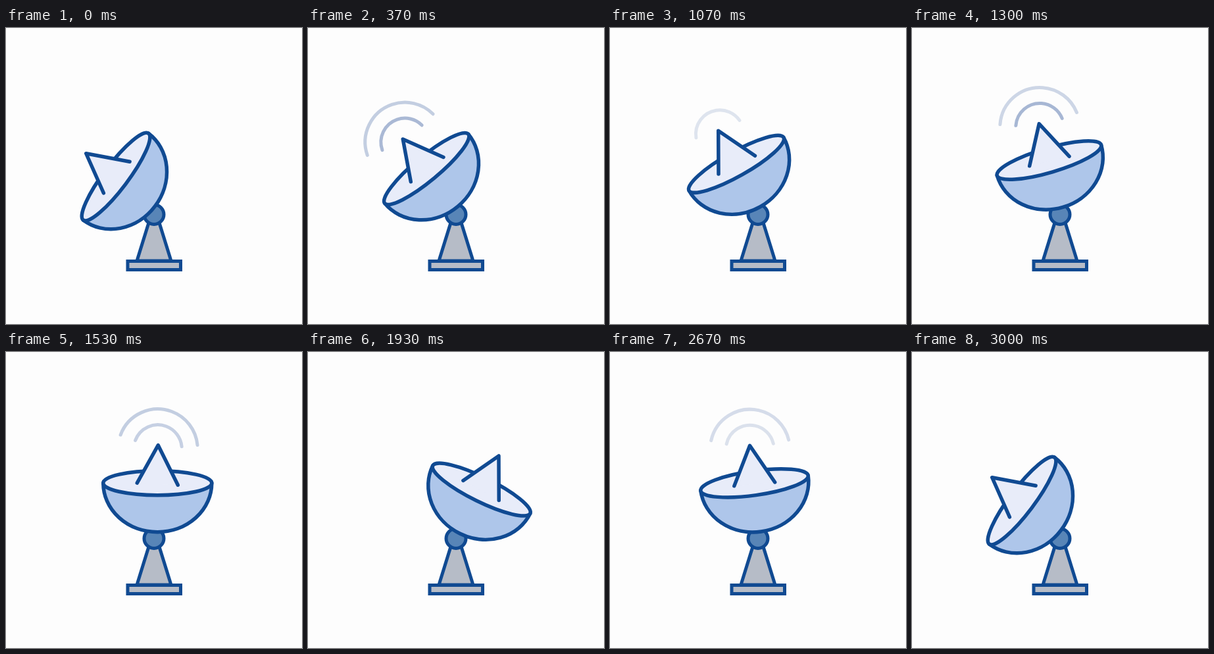
These frames come from a looping animation (450x450 px, 3.03 s). An HTML page:

```html
<!DOCTYPE html>
<html lang="en">
<head>
<meta charset="utf-8">
<title>Satellite dish</title>
<style>
  html, body { margin: 0; width: 100%; height: 100%; overflow: hidden; background: #fdfdfd; }
  svg { display: block; width: 100%; height: 100%; }
</style>
</head>
<body>
<svg viewBox="0 0 450 450" fill="none" stroke="#104a92" stroke-width="5">
  <path d="M217 296H233L251 354H199Z" fill="#b6bcc7"/>
  <rect x="185" y="354.5" width="80.5" height="13" fill="#b6bcc7"/>
  <circle cx="225" cy="283.5" r="15" fill="#5885b7"/>
  <g id="dish" stroke-width="5.5" stroke-linecap="round" stroke-linejoin="round">
    <path d="M-82.5 0A82.5 74.5 0 0 0 82.5 0Z" fill="#aec6ea"/>
    <ellipse rx="82.5" ry="18.5" fill="#e8ecf9"/>
    <path d="M-31 0L1 -57.5L31 3" fill="#e8ecf9"/>
    <g stroke="#1c4690" stroke-width="5" transform="translate(.5 -52) rotate(200.5)">
      <circle id="inner" r="36.5" pathLength="360" stroke-dasharray="154 206"/>
      <circle id="outer" r="60.5" pathLength="360" stroke-dasharray="154 206"/>
    </g>
  </g>
</svg>
<script>
  const LOOP = 3030, FPS = 30, PULSE = 30;
  const [dish, inner, outer] = ['dish', 'inner', 'outer'].map(id => document.getElementById(id));

  // Keyframes are [frame, value]
  const turn = [[0, -53], [15, -37], [22, -37], [70, 37], [90, -53]];
  const innerFade = [[0, 0], [6, .4], [11, .37], [26, 0]];
  const outerFade = [[4, 0], [10, .26], [17, .26], [27, 0]];

  const linear = u => u;
  const sine = u => (1 - Math.cos(Math.PI * u)) / 2;

  function valueAt(keys, f, ease) {
    const i = keys.findIndex(k => k[0] > f);
    if (i === 0) return keys[0][1];
    if (i < 0) return keys[keys.length - 1][1];
    const [a, from] = keys[i - 1], [b, to] = keys[i];
    return from + (to - from) * ease((f - a) / (b - a));
  }

  function draw(ms) {
    const f = Math.min(90, Math.floor(ms % LOOP * FPS / 1000 + .1));
    const angle = valueAt(turn, f, sine);
    dish.setAttribute('transform', `translate(225.7 276.1) rotate(${angle}) translate(4.6 -76.9)`);
    inner.setAttribute('stroke-opacity', valueAt(innerFade, f % PULSE, linear));
    outer.setAttribute('stroke-opacity', valueAt(outerFade, f % PULSE, linear));
  }

  const start = performance.now();
  function tick() {
    draw(performance.now() - start);
    requestAnimationFrame(tick);
  }
  tick();
</script>
</body>
</html>
```
